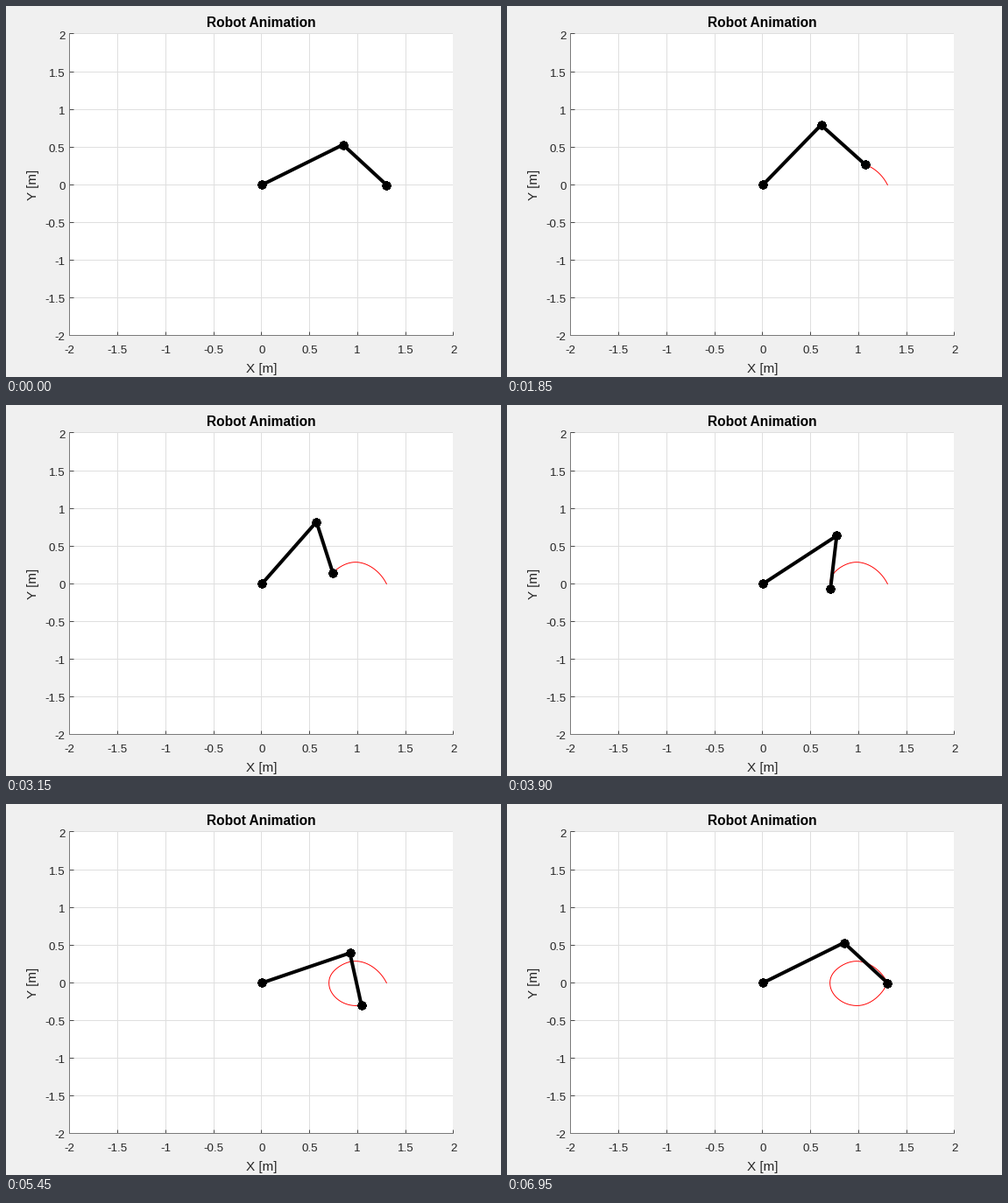
These frames come from a looping animation (565x424 px, 7 s). A matplotlib script:

```python
import numpy as np
import matplotlib.pyplot as plt
from matplotlib.animation import FuncAnimation
from matplotlib.transforms import offset_copy

W, H, DPI = 565, 424, 100
PX = 72 / DPI                      # points per pixel
L1, L2, R = 1.0, 0.7, 0.3          # link lengths, radius of the path
STEPS, HOLD = 130, 9
INK = "#262626"

plt.rcParams["font.family"] = "Liberation Sans"
plt.rcParams["axes.unicode_minus"] = False

fig = plt.figure(figsize=(W / DPI, H / DPI), dpi=DPI, facecolor="#f0f0f0")


def label(x, y, text, size, color=INK, ha="center", va="baseline", **kw):
    fig.text(x / W, 1 - y / H, text, fontsize=size * PX, color=color,
             ha=ha, va=va, **kw)


# Axes
ax = fig.add_axes([72.4 / W, 1 - 376.4 / H, 438 / W, 345 / H])
ticks = np.arange(-2, 2.1, 0.5)
ax.set(xlim=(-2, 2), ylim=(-2, 2), xticks=ticks, yticks=ticks)
ax.set_axisbelow(True)
ax.grid(color="#dfdfdf", lw=PX)
ax.tick_params(direction="in", length=4.5 * PX, width=PX, color="#4a4a4a",
               labelbottom=False, labelleft=False)
for side in ("top", "right"):
    ax.spines[side].set_visible(False)
for side in ("left", "bottom"):
    ax.spines[side].set(color="#7a7a7a", linewidth=PX)

for v in ticks:
    label(291.7 + 109.5 * v, 396.8, f"{v:g}", 13.4)
    label(67.5, 210 - 86.25 * v, f"{v:g}", 13.4, ha="right")
label(291.7, 24, "Robot Animation", 15.55, "black", weight="bold")
label(292, 418.5, "X [m]", 15.3)
label(31, 204, "Y [m]", 15.3, va="center", rotation=90)


def hermite(u, values, slopes):
    """Cubic pieces through values at u = 0, 1, 2, ... with given slopes."""
    i = np.minimum(u.astype(int), len(values) - 2)
    s = u - i
    p, d = np.array(values), np.array(slopes)
    ease = s * s * (3 - 2 * s)
    return (p[i] * (1 - ease) + p[i + 1] * ease
            + d[i] * s * (1 - s) ** 2 - d[i + 1] * s * s * (1 - s))


# Inverse kinematics at the quarter points; the top one falls a little short
turn = np.arange(5) * np.pi / 2
wx, wy = 1 + R * np.cos(turn), R * np.sin(turn)
wy[1] = 0.287
dist = np.hypot(wx, wy)
phi = np.arctan2(wy, wx)
alpha = np.arccos((dist**2 + L1**2 - L2**2) / (2 * L1 * dist))
beta = np.arccos((dist**2 + L2**2 - L1**2) / (2 * L2 * dist))

# Joint paths, at rest at both ends
u = np.arange(STEPS + 1) * 4 / STEPS
aim = hermite(u, phi, [0, 0.18, -0.72, 0.18, 0])
q1 = aim + hermite(u, alpha, [0, 0.20, 0, -0.20, 0])
q12 = aim - hermite(u, beta, [0, 0.52, 0, -0.52, 0])
ex, ey = L1 * np.cos(q1), L1 * np.sin(q1)
tx, ty = ex + L2 * np.cos(q12), ey + L2 * np.sin(q12)

# Curves sit on pixel centres, half a pixel off the grid
shifted = offset_copy(ax.transData, fig, 0.6 * PX, -0.6 * PX, units="points")
trail, = ax.plot([], [], color="red", lw=0.95 * PX, zorder=3,
                 transform=shifted)
arm, = ax.plot([], [], color="black", lw=4 * PX, zorder=4,
               marker=(8, 2, 0), ms=10.4 * PX, mew=3 * PX,
               solid_joinstyle="round", snap=False, transform=shifted)


def update(i):
    k = max(0, i - HOLD)
    trail.set_data(tx[:k + 1], ty[:k + 1])
    arm.set_data([0, ex[k], tx[k]], [0, ey[k], ty[k]])
    return trail, arm


anim = FuncAnimation(fig, update, frames=STEPS + HOLD + 1, interval=50,
                     repeat=True, repeat_delay=0, blit=False)
plt.show()
```
